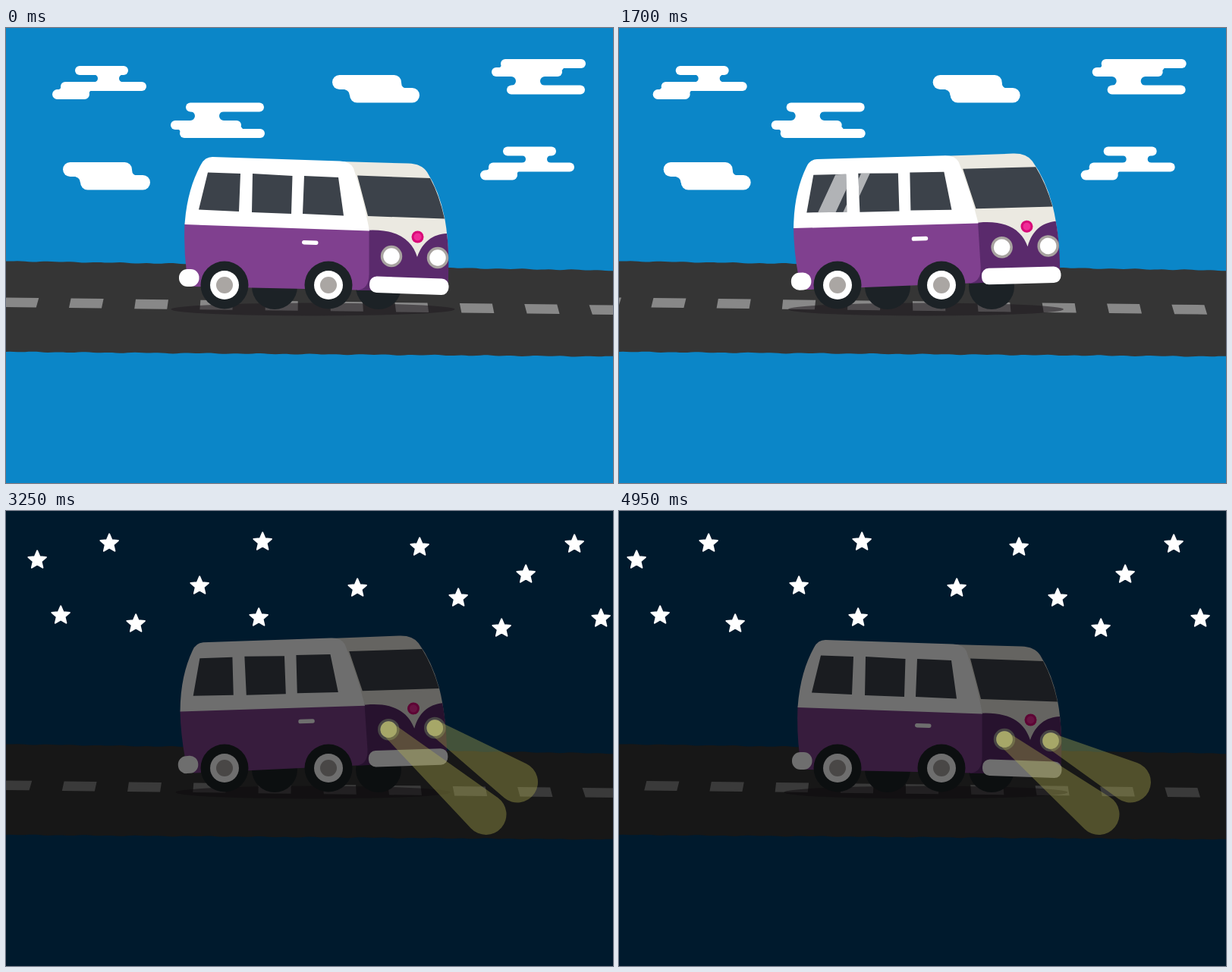
An HTML page for the animation above (5 s loop, 800x600 px).

```html
<!DOCTYPE html>
<html lang="en">
<head>
<meta charset="utf-8">
<title>Van on the road</title>
<style>
html, body { margin: 0; width: 100%; height: 100%; overflow: hidden; background: #0b86c8; }
svg { display: block; width: 100vw; height: 100vh; }
body.night { background: #001a2d; }
.night #scene { filter: brightness(.43); }
.night .day, body:not(.night) .dark { display: none; }
</style>
</head>
<body>
<svg viewBox="0 0 800 600">
  <defs>
    <g id="cloudA">
      <rect x="91" y="50" width="70" height="12" rx="6"/>
      <path d="M116 61.500a5 5 0 0 1 0 10H154a5 5 0 0 1 0-10Z"/>
      <rect x="72" y="71" width="113" height="12" rx="6"/>
      <rect x="61" y="81" width="49" height="13" rx="6.500"/>
      <path d="M66 81.500Q73 81.500 73 76H80V82H114Q109 82 109 90H70Z"/>
    </g>
    <g id="cloudB">
      <rect x="237" y="98.500" width="103" height="12" rx="6"/>
      <path d="M243 110a6 6 0 0 1 0 12H287a6 6 0 0 1 0-12Z"/>
      <rect x="217" y="122" width="93" height="12" rx="6"/>
      <rect x="229" y="133" width="112" height="12" rx="6"/>
      <path d="M224 133Q230 133 230 139H312V133L308 128Z"/>
    </g>
    <g id="cloudC">
      <rect x="75" y="177" width="91" height="19" rx="9.500"/>
      <rect x="98" y="194" width="92" height="19.500" rx="9.700"/>
      <path d="M86 195Q98 196 98 204H175V195Q166 195 166 187H150Z"/>
    </g>
    <g id="wheel">
      <circle r="31.500" fill="#1c2226"/>
      <circle r="19" fill="#fff"/>
      <circle r="11" fill="#aaa6a3"/>
    </g>
    <path id="glass" d="M266 190.500 309 192 307 242 254 239.500ZM325 192 377.500 195 376 245 324 243ZM393 195 438 197 445 247.500 391 245ZM463 194.500 559 198Q571 220 578 251.500L477 248Z"/>
    <clipPath id="glassClip"><use href="#glass"/></clipPath>
  </defs>

  <g id="scene">
    <g id="clouds" class="day" fill="#fff">
      <use href="#cloudA"/>
      <use href="#cloudA" x="564" y="106.500"/>
      <use href="#cloudB"/>
      <use href="#cloudB" transform="translate(423 186) scale(1 -1)"/>
      <use href="#cloudC"/>
      <use href="#cloudC" x="355" y="-115"/>
    </g>
    <path id="road" fill="#353535"/>
    <path id="dashes" fill="#888"/>
    <ellipse id="shadow" cx="404.500" cy="371" ry="8.500" fill="#1f1b20" opacity=".55"/>
    <circle cx="354" cy="341" r="30" fill="#1c2226"/>
    <circle cx="491" cy="341" r="30" fill="#1c2226"/>

    <g id="van">
      <path d="M440 176 530 178.500Q548 179 555 190 571 215 578 250 582 270 583 300L582 340H470L440 200Z" fill="#ebe9e1"/>
      <path d="M470 267C515 263 535 279 542 302 549 282 562 272 581 271Q585 300 582 346H463V300Z" fill="#5a2a6c"/>
      <path d="M235.500 257 478.500 265V325Q478 345 463 345.500L250 341Q239 341 238 322 234 290 235.500 257Z" fill="#80408f"/>
      <path d="M235.500 259C238 225 246 200 257 180Q262 170 272 170L440 175.500Q454 176 458 185 470 220 479 267.500Z" fill="#fff"/>
      <use href="#glass" fill="#3c424a"/>
      <g clip-path="url(#glassClip)">
        <path id="shine" class="day" fill="#fff" opacity=".6" d="M0 192h12L-22 255h-12ZM-34 192h24L-44 255h-24Z"/>
      </g>
      <rect x="390" y="280.200" width="21.500" height="5.500" rx="2.700" fill="#fff" transform="rotate(2 401 283)"/>
      <circle cx="542.500" cy="275.500" r="8" fill="#d80a78"/>
      <circle cx="542.500" cy="275.500" r="5" fill="#f02c98"/>
      <g fill="#fff" stroke="#a8a3a0" stroke-width="3.500">
        <circle cx="508" cy="301" r="12.500"/>
        <circle cx="569" cy="303" r="12.500"/>
      </g>
      <rect x="479" y="329" width="104.500" height="21.500" rx="9.500" fill="#fff" transform="rotate(2 531 340)"/>
      <rect x="228" y="318" width="26.500" height="23" rx="11" fill="#fff"/>
    </g>
    <use href="#wheel" x="288" y="339"/>
    <use href="#wheel" x="425" y="339"/>
  </g>

  <path id="stars" class="dark" fill="#fff" stroke="#fff" stroke-width="2" stroke-linejoin="round"/>
  <g class="dark">
    <path class="beam" fill="#b5b352" opacity=".37"/>
    <path class="beam" fill="#b5b352" opacity=".37"/>
    <circle class="lamp" r="10.800" fill="#a6a768"/>
    <circle class="lamp" r="10.800" fill="#a6a768"/>
  </g>
</svg>
<script>
const LOOP = 5000, STEP = 50, NIGHT = 2.5;
const PIVOT = [315, 350];
const LAMPS = [[508, 301], [569, 303]];
const BEAM_ENDS = [[632.5, 400], [674, 357.5]];
const STARS = [[47, 64], [142, 42], [344, 40], [261, 98], [78, 137], [177, 148], [339, 140],
  [469, 101], [551, 47], [602, 114], [659, 154], [691, 83], [755, 43], [790, 141]];

const $ = id => document.getElementById(id);
const set = (el, name, value) => el.setAttribute(name, value);
const beams = document.querySelectorAll('.beam');
const lamps = document.querySelectorAll('.lamp');
const polar = ([x, y], r, a) => [x + r * Math.cos(a), y + r * Math.sin(a)];
const polygon = points => 'M' + points.join('L') + 'Z';

const star = center => polygon(Array.from({ length: 10 }, (_, i) =>
  polar(center, i % 2 ? 5.6 : 12.3, (i / 5 - .5) * Math.PI)));
set($('stars'), 'd', STARS.map(star).join(''));

// Slightly uneven road edge from x = 0 to 800
const roadEdge = (y0, y1, phase) => Array.from({ length: 161 }, (_, i) => {
  const x = i * 5;
  return [x, y0 + (y1 - y0) * x / 800 + .4 * Math.sin(x * .19 + phase) + .3 * Math.sin(x * .083 - phase)];
});
set($('road'), 'd', polygon([...roadEdge(307.3, 319.8, 1), ...roadEdge(427, 433.3, 4).reverse()]));

function dashes(t) {
  const gap = 85.8;
  let d = '';
  for (let x = -1.5 - (478 * t) % gap - gap; x < 820; x += gap) {
    const lean = (x - 350) * .005, y = 355.5 + x * .0125;
    d += polygon([[x - lean, y], [x + 43 - lean, y + .5],
      [x + 43 + lean, y + 13], [x + lean, y + 12.5]]);
  }
  return d;
}

// Tapered capsule between a lamp and the spot on the road
function beam(a, b) {
  const r = 10, R = 27, dx = b[0] - a[0], dy = b[1] - a[1];
  const dir = Math.atan2(dy, dx);
  const side = Math.PI / 2 + Math.asin((R - r) / Math.hypot(dx, dy));
  return `M${polar(a, r, dir - side)}L${polar(b, R, dir - side)}` +
    `A${R} ${R} 0 1 1 ${polar(b, R, dir + side)}` +
    `L${polar(a, r, dir + side)}A${r} ${r} 0 0 1 ${polar(a, r, dir - side)}Z`;
}

function rotate([x, y], angle) {
  const [px, py] = PIVOT, c = Math.cos(angle), s = Math.sin(angle);
  return [px + (x - px) * c - (y - py) * s, py + (x - px) * s + (y - py) * c];
}

function draw(t) {
  document.body.classList.toggle('night', t >= NIGHT);
  const swing = 1.35 * Math.cos(2 * Math.PI * (5.0444 * t + .069));
  const lift = (1 - Math.max(-1, Math.min(1, swing))) / 2;
  const tilt = -3.85 * lift;

  set($('van'), 'transform', `rotate(${tilt} ${PIVOT})`);
  set($('shadow'), 'rx', 187 - 6 * lift);
  set($('dashes'), 'd', dashes(t));
  set($('clouds'), 'transform', `translate(${-9.6 * t})`);
  set($('shine'), 'transform', `translate(${741.5 - 242.7 * t})`);
  set($('stars'), 'transform', `translate(${-10.6 * (t - 2.7)} .7)`);
  LAMPS.forEach((lamp, i) => {
    const p = rotate(lamp, tilt * Math.PI / 180);
    set(beams[i], 'd', beam(p, BEAM_ENDS[i]));
    set(lamps[i], 'cx', p[0]);
    set(lamps[i], 'cy', p[1]);
  });
}

let last = -1;
function tick() {
  const step = Math.floor(performance.now() % LOOP / STEP);
  if (step !== last) draw((last = step) * STEP / 1000);
  requestAnimationFrame(tick);
}
tick();
</script>
</body>
</html>
```
